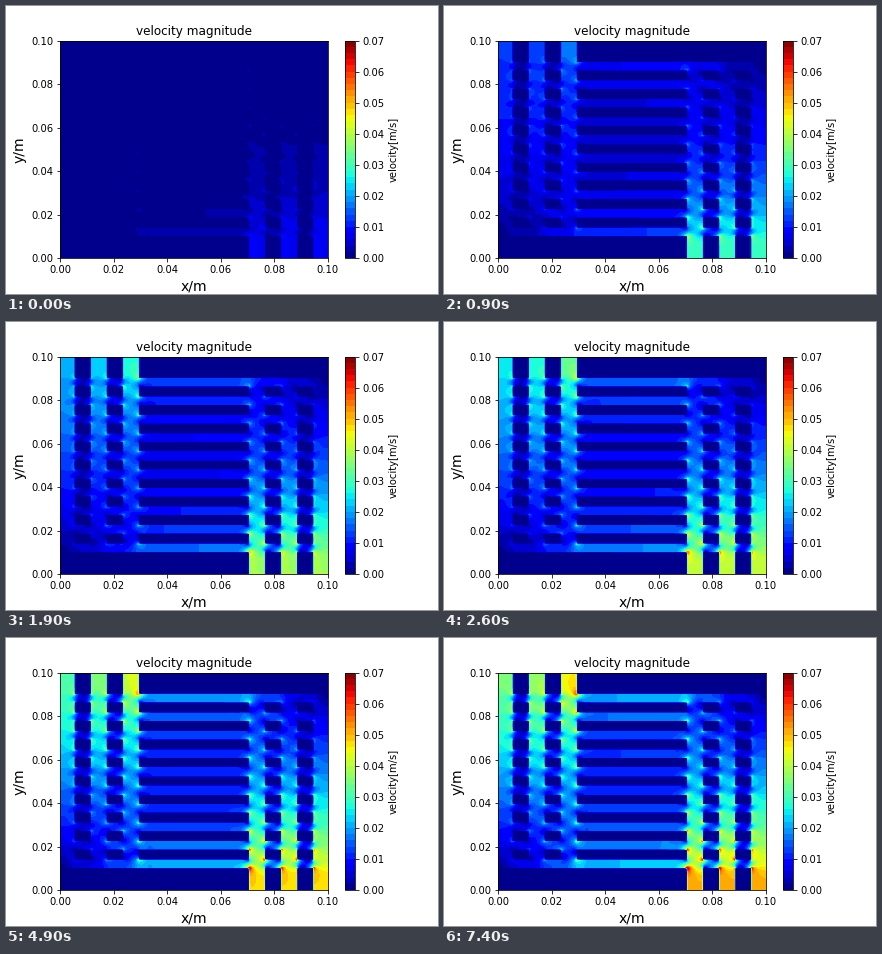
A matplotlib script for the animation above (7.5 s loop, 432 by 288 pixels).

```python
import numpy as np
import matplotlib.pyplot as plt
from matplotlib.animation import FuncAnimation
from matplotlib.colors import ListedColormap

SIZE, VMAX, BANDS = 0.1, 0.07, 35
N = 200
FRAMES, STEP = 75, 100

plt.rcParams["font.family"] = "DejaVu Sans"


def fluid_mask(x, y):
    """True where liquid can flow: two slotted headers joined by ten ducts."""
    col = 0.006
    left = x < 0.0295
    right = x > 0.0705
    slot = (left & (np.floor((x + 0.0005) / col) % 2 == 0)) \
        | (right & (np.floor((x - 0.0705) / col) % 2 == 0))
    pitch = 0.08 / 19
    core = (y > 0.01) & (y < 0.09)
    duct = core & (np.floor((y - 0.01) / pitch) % 2 == 0)
    return duct | (core & slot) | (left & slot & (y > 0.09)) \
        | (right & slot & (y < 0.01))


def solve(m):
    """Potential flow with unit inflow below and open slots on top."""
    cx = (m[:, 1:] & m[:, :-1]).astype(float)
    cy = (m[1:] & m[:-1]).astype(float)
    outlet = 2.0 * m[-1]

    def apply(p):
        fx, fy = cx * np.diff(p, axis=1), cy * np.diff(p, axis=0)
        r = np.zeros_like(p)
        r[:, :-1] -= fx
        r[:, 1:] += fx
        r[:-1] -= fy
        r[1:] += fy
        r[-1] += outlet * p[-1]
        return r

    # conjugate gradients
    p = np.zeros(m.shape)
    r = np.zeros(m.shape)
    r[0] = m[0]
    d, rr = r.copy(), np.sum(r * r)
    for _ in range(3000):
        q = apply(d)
        a = rr / np.sum(d * q)
        p += a * d
        r -= a * q
        new = np.sum(r * r)
        if new < 1e-7:
            break
        d = r + new / rr * d
        rr = new

    fx = np.pad(-cx * np.diff(p, axis=1), ((0, 0), (1, 1)))
    fy = np.vstack([m[0], -cy * np.diff(p, axis=0), outlet * p[-1]])
    u = (fx[:, 1:] + fx[:, :-1]) / 2
    v = (fy[1:] + fy[:-1]) / 2
    return p, np.hypot(u, v)


c = (np.arange(N) + 0.5) * SIZE / N
X, Y = np.meshgrid(c, c)
fluid = fluid_mask(X, Y)
head, speed = solve(fluid)
head = np.clip(1.12 * head / head[0][fluid[0]].mean(), 0, 1) ** 1.5
speed = np.minimum(speed, 1.38)
speed *= 1 - 0.2 * np.clip((0.021 - np.abs(X - 0.05)) / 0.004, 0, 1)

# Inlet and outlet speeds rise almost linearly in logarithmic time.
KEYS = np.log1p(np.array([0, 500, 1300, 2600, 4000, 5800, 7400]) / 300)
INLET = [0.008, 0.023, 0.034, 0.0415, 0.046, 0.0495, 0.0505]
OUTLET = [0.0, 0.008, 0.018, 0.029, 0.034, 0.038, 0.0395]


def field(ms):
    t = np.log1p(ms / 300)
    a, b = np.interp(t, KEYS, INLET), np.interp(t, KEYS, OUTLET)
    return speed * (b + (a - b) * head)


fig, ax = plt.subplots(figsize=(6, 4), dpi=72, facecolor="white")
fig.subplots_adjust(left=0.125, right=0.9, bottom=0.125, top=0.88)
cmap = ListedColormap(plt.get_cmap("jet")((np.arange(BANDS) + 0.5) / BANDS))
im = ax.imshow(field(0), cmap=cmap, vmin=0, vmax=VMAX, origin="lower",
               extent=(0, SIZE, 0, SIZE), aspect="auto",
               interpolation="bilinear", interpolation_stage="data")
bar = fig.colorbar(im, ax=ax, ticks=np.arange(8) * 0.01, format="%.2f")
bar.set_label("velocity[m/s]", fontsize=10)
bar.minorticks_off()

ticks = np.arange(6) * 0.02
labels = [f"{v:.2f}" for v in ticks]
ax.set_xticks(ticks, labels)
ax.set_yticks(ticks, labels)
ax.set_title("velocity magnitude", fontsize=12)
ax.set_xlabel("x/m", fontsize=14)
ax.set_ylabel("y/m", fontsize=14)


def draw(i):
    im.set_data(field(i * STEP))
    return [im]


anim = FuncAnimation(fig, draw, frames=FRAMES, interval=STEP,
                     repeat=True, repeat_delay=0)
plt.show()
```
